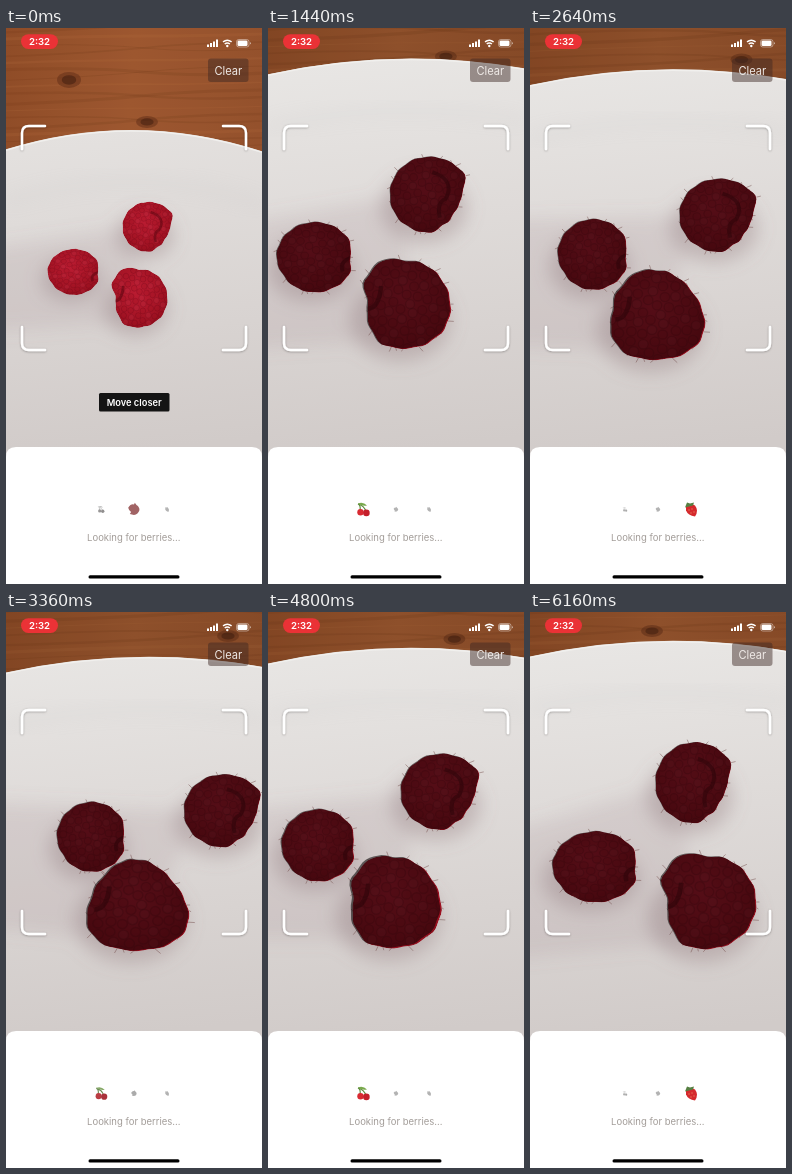
Write an HTML page that moves like this. It is 256x556 px and loops after 6240 ms.

```html
<!DOCTYPE html>
<html lang="en">
<head>
<meta charset="utf-8">
<title>Berry scanner</title>
<style>
  html, body { margin: 0; width: 100%; height: 100%; overflow: hidden; background: #fff; }
  svg { display: block; width: 100%; height: 100%; }
  text { font-family: Inter, Roboto, sans-serif; text-anchor: middle; }
</style>
</head>
<body>
<svg id="stage" viewBox="0 0 256 556" xmlns="http://www.w3.org/2000/svg">
  <defs>
    <linearGradient id="wood" x1="0" y1="0" x2="1" y2=".15">
      <stop offset="0" stop-color="#955029"/><stop offset=".5" stop-color="#a35c32"/><stop offset="1" stop-color="#9a552e"/>
    </linearGradient>
    <linearGradient id="china" gradientUnits="userSpaceOnUse" x1="110" y1="30" x2="150" y2="420">
      <stop offset="0" stop-color="#e8e6e4"/><stop offset=".4" stop-color="#dfdbd9"/><stop offset="1" stop-color="#d1cbc9"/>
    </linearGradient>
    <radialGradient id="flesh" cx=".45" cy=".38" r=".65">
      <stop offset="0" stop-color="#bb1c32"/><stop offset=".6" stop-color="#a81527"/><stop offset="1" stop-color="#960f1e"/>
    </radialGradient>
    <filter id="soft" x="-60%" y="-60%" width="220%" height="220%"><feGaussianBlur stdDeviation="9"/></filter>
    <filter id="glow" x="-20%" y="-20%" width="140%" height="140%"><feDropShadow dx="0" dy=".6" stdDeviation="1" flood-opacity=".35"/></filter>
  </defs>

  <rect width="256" height="420" fill="url(#wood)"/>
  <g id="grain"></g>
  <rect id="shade" width="256" height="420" fill="#26120a"/>
  <path id="plate" fill="url(#china)"/>
  <path id="rim" fill="none" stroke="#f1f0ee" stroke-width="1.500"/>
  <path id="well" fill="none" stroke="#aeb0b2" stroke-width="10" opacity=".1" filter="url(#soft)"/>
  <g id="shadows" fill="#8d7479" filter="url(#soft)"><path id="gloom" opacity=".14"/></g>
  <g id="berries"></g>
  <g id="masks" fill="#060303" fill-opacity=".56"></g>

  <g fill="none" stroke="#fff" stroke-width="2.500" stroke-linecap="round" filter="url(#glow)">
    <path d="M16 121V105Q16 98 23 98H39M217 98H233Q240 98 240 105V121M16 299V315Q16 322 23 322H39M217 322H233Q240 322 240 315V299"/>
  </g>

  <rect x="15" y="6.200" width="37" height="14.800" rx="7.400" fill="#ea3236"/>
  <text x="33.500" y="17" font-size="9.600" font-weight="600" fill="#fff">2:32</text>
  <g transform="translate(0 -.5)">
    <g fill="#fff">
      <path d="M201 17h2v2.500h-2zM204 15.500h2v4h-2zM207 14h2v5.500h-2zM210 12h2v7.500h-2z"/>
      <rect x="231.500" y="13" width="10" height="5.500" rx="1.300"/>
      <path d="M244 14.500q1.400 1.200 0 2.400z"/>
      <circle cx="221.300" cy="18.500" r="1.200"/>
    </g>
    <g fill="none" stroke="#fff">
      <path d="M217 14.400q4.300-3.400 8.600 0M218.700 16.500q2.600-2.200 5.200 0" stroke-width="1.400"/>
      <rect x="230.500" y="12" width="12.500" height="7.500" rx="2.300" stroke-width=".7" opacity=".6"/>
    </g>
  </g>
  <rect x="202" y="30.500" width="40.500" height="23.500" rx="3" fill="#3c2723" fill-opacity=".47"/>
  <text x="222.300" y="46.600" font-size="11.100" fill="#eee9e6">Clear</text>

  <g id="hint">
    <rect x="93" y="365" width="70.500" height="18.500" rx="1.500" fill="#141414"/>
    <text x="128.200" y="377.600" font-size="9.300" font-weight="600" fill="#fff">Move closer</text>
  </g>

  <path d="M0 556V429Q0 419 10 419H246Q256 419 256 429V556Z" fill="#fff"/>
  <g id="icons">
    <g>
      <path d="M-3 1Q-2-4-5-5.500M3 2Q1-4-5-5.500" fill="none" stroke="#5d8a3c" stroke-width="1.200"/>
      <path d="M-5-6Q0-8 4-4Q-1-3-5-6Z" fill="#79a94c"/>
      <circle cx="-2.500" cy="2.800" r="3.200" fill="#d92a32"/><circle cx="3.400" cy="3.400" r="3.300" fill="#c51f2b"/>
    </g>
    <path d="M-7-2Q-4-7 0-6L1-8L3-5.500Q7-3 6.500 1Q5 6 0 6.500L-5 5.500L-3.500 3Q-6 2-7-2Z" fill="#e23436"/>
    <g>
      <path d="M-5-3Q-1-7 4-4Q8 1 4 7Q-3 6-5 1Z" fill="#d5292d"/>
      <path d="M-6-2L-4-7L-1-6L3-7L2-4L-2-3Z" fill="#567f42"/>
      <path d="M-2 0v1M1-1v1M3 2v1M0 3v1" stroke="#f5c37e" stroke-width=".8"/>
    </g>
  </g>
  <text x="127.800" y="512.500" font-size="9.500" fill="#a39d99">Looking for berries...</text>
  <rect x="82.500" y="547.300" width="91" height="3.200" rx="1.600" fill="#000"/>
</svg>
<script>
const LOOP = 6240, LOADER = 1760, TAU = Math.PI * 2;
const NS = 'http://www.w3.org/2000/svg';
const $ = id => document.getElementById(id);
const clamp = v => Math.max(0, Math.min(1, v));

function add(parent, tag, attrs = {}) {
  const el = document.createElementNS(NS, tag);
  set(el, attrs);
  return parent.appendChild(el);
}
function set(el, attrs) {
  for (const k in attrs) el.setAttribute(k, attrs[k]);
}

// Camera poses at these times
const times = [0, 800, 2000, 3360, 4320, 5200, 6160];
const plateTop = [102, 33, 37, 45, 37, 35, 29];
const knot = { x: [141, 158, 196, 222, 206, 167, 122], y: [94, 25, 37, 24, 27, 26, 19] };
const taper = [0, 0, .12, .3, .24, .02, 0];

// "radii" run clockwise from the right in equal turns
const berries = [
  { x: [142, 165, 161, 217, 185, 166, 164], y: [199, 165, 175, 199, 186, 176, 171],
    w: [51, 73, 78, 78, 80, 79, 77], h: [50, 75, 74, 73, 74, 78, 81], lag: .4,
    radii: [.87, .82, .88, 1, .99, 1, 1, 1, 1, 1, 1.03, 1.08] },
  { x: [68, 60, 43, 86, 55, 53, 66], y: [244, 232, 228, 225, 221, 245, 255],
    w: [53, 78, 74, 70, 72, 79, 87], h: [46, 67, 71, 70, 71, 73, 71], lag: .55,
    radii: [.9, 1, .99, 1, .99, .97, 1, 1, 1, 1, 1, 1] },
  { x: [133, 154, 123, 131, 105, 149, 178], y: [270, 273, 280, 293, 287, 293, 290],
    w: [57, 86, 91, 100, 100, 90, 97], h: [60, 88, 90, 92, 92, 94, 96], lag: 1.1, tapers: true,
    radii: [1, 1, .98, .98, 1.02, .9, .81, 1.08, 1.12, .95, .98, .99] }
];

function sample(track, t) {
  const n = times.length - 1;
  let i = 0;
  while (i < n - 1 && t > times[i + 1]) i++;
  const u = clamp((t - times[i]) / (times[i + 1] - times[i]));
  const b = track[i], c = track[i + 1];
  const a = track[Math.max(0, i - 1)], d = track[Math.min(n, i + 2)];
  return b + u / 2 * (c - a + u * (2 * a - 5 * b + 4 * c - d + u * (3 * (b - c) + d - a)));
}

function radiusAt(radii, angle) {
  const n = radii.length, p = ((angle / TAU % 1) + 1) % 1 * n;
  const i = Math.floor(p), u = p - i, ease = u * u * (3 - 2 * u);
  return radii[i % n] * (1 - ease) + radii[(i + 1) % n] * ease;
}
function edge(berry, pose, angle, reach = 1) {
  const lobe = (radiusAt(berry.radii, angle) - 1) * (1 - 2.5 * pose.taper);
  const r = reach * (1 + lobe + .012 * Math.sin(13 * angle + berry.lag * 5));
  const s = Math.sin(angle);
  return (pose.x + pose.w / 2 * r * Math.cos(angle) * (1 + pose.taper * s)).toFixed(2) + ' ' +
         (pose.y + pose.h / 2 * r * s).toFixed(2);
}
function outline(berry, pose) {
  const points = Array.from({ length: 72 }, (_, i) => edge(berry, pose, i / 72 * TAU));
  return 'M' + points.join('L') + 'Z';
}
function hairs(berry, pose) {
  let d = '';
  for (let i = 0; i < 22; i++) {
    const a = i / 22 * TAU + .2 * Math.sin(i * 5.3);
    const tip = 1.07 + .06 * Math.sin(i * 3.7);
    d += 'M' + edge(berry, pose, a) + 'L' + edge(berry, pose, a + .05 * Math.sin(i * 9), tip);
  }
  return d;
}

for (let i = 0; i < 26; i++) {
  const y = -110 + i * 8, bend = 5 * Math.sin(i * 2.1);
  add($('grain'), 'path', {
    d: `M-260 ${y + 8}Q-90 ${y - bend} 0 ${y + bend}T260 ${y - 8}`, fill: 'none',
    stroke: i % 3 ? '#713719' : '#bc7442', 'stroke-width': 1 + i % 4 * .7, opacity: .18
  });
}
[[0, 0, 11, 6], [-78, -42, 12, 8]].forEach(([cx, cy, rx, ry]) => {
  add($('grain'), 'ellipse', { cx, cy, rx, ry, fill: '#5a2b17', opacity: .45 });
  add($('grain'), 'ellipse', { cx, cy, rx: rx * .6, ry: ry * .6, fill: '#3d1b0e', opacity: .5 });
});

berries.forEach((berry, n) => {
  berry.shadow = add($('shadows'), 'ellipse');
  berry.hair = add($('berries'), 'path', { fill: 'none', stroke: '#6d4542', 'stroke-width': .6 });
  berry.clip = add(add(document.querySelector('defs'), 'clipPath', { id: 'clip' + n }), 'path');
  const body = add($('berries'), 'g', { 'clip-path': `url(#clip${n})` });
  berry.body = add(body, 'path', { fill: 'url(#flesh)' });
  berry.texture = add(body, 'g');
  for (let i = 0; i < 62; i++) {
    const r = 1.05 * Math.sqrt((i + .5) / 62), a = i * 2.4;
    add(berry.texture, 'circle', {
      cx: r * Math.cos(a), cy: r * Math.sin(a), r: .1, fill: i % 3 ? '#9a1022' : '#c4384a',
      'fill-opacity': .2, stroke: '#5f0817', 'stroke-width': .03, 'stroke-opacity': .25
    });
  }
  const crease = ['M.1-.6Q.7-.4.45.1Q.2.2.3.6', 'M.95 0Q.6.1.7.4', 'M-.85.1Q-.6.1-.55-.4'][n];
  add(berry.texture, 'path', { d: crease, fill: 'none', stroke: '#56050f', 'stroke-width': .1, opacity: .5 });
  berry.mask = add($('masks'), 'path');
});

function drawPlate(t, near) {
  const top = sample(plateTop, t);
  const left = top + 20 - 4 * near, right = top + 22 - 12 * near;
  const arc = shift => `M-2 ${left + shift}Q128 ${2 * top - (left + right) / 2 + shift} 258 ${right + shift}`;
  set($('plate'), { d: arc(0) + 'V430H-2Z' });
  set($('rim'), { d: arc(1) });
  set($('well'), { d: arc(52) });
  set($('shade'), { opacity: .05 + .12 * near });
  set($('grain'), { transform: `translate(${sample(knot.x, t)} ${sample(knot.y, t)})` });
}

function drawBerries(t, near) {
  const delay = 1 + 14 * Math.exp(-(((t - 5200) / 220) ** 2));
  const poses = berries.map(berry => {
    const pose = { taper: berry.tapers ? sample(taper, t) : 0 };
    for (const k of ['x', 'y', 'w', 'h']) pose[k] = sample(berry[k], t);
    return pose;
  });
  berries.forEach((berry, i) => {
    const pose = poses[i], d = outline(berry, pose);
    set(berry.body, { d });
    set(berry.clip, { d });
    set(berry.texture, { transform: `translate(${pose.x} ${pose.y}) scale(${pose.w / 2} ${pose.h / 2})` });
    set(berry.shadow, {
      cx: pose.x - pose.w * .06, cy: pose.y + pose.h * .17, rx: pose.w * .56, ry: pose.h * .46, opacity: .34
    });
    set(berry.hair, { d: hairs(berry, pose), opacity: .75 * near });
    const shift = delay * berry.lag;
    set(berry.mask, { d: outline(berry, { ...pose, x: pose.x - shift, y: pose.y - shift * .5 }) });
  });
  // Broad shade that falls to the left of the group
  const [a, b, c] = poses;
  set($('gloom'), { d: `M-20 ${b.y - b.h * .5}L${a.x - a.w * .3} ${a.y}L${c.x} ${c.y + c.h * .4}L-20 ${b.y + b.h * 1.3}Z` });
  set($('masks'), { opacity: t < 480 ? 0 : 1 });
  set($('hint'), { opacity: t < 480 ? 1 : 0 });
}

function drawLoader(t) {
  const phase = t / LOADER + .5;
  [...$('icons').children].forEach((icon, i) => {
    const turn = phase - (.3 + i / 3);
    const away = Math.abs(turn - Math.round(turn));
    const live = clamp((.167 + .07 - away) / .14);
    set(icon, { transform: `translate(${95 + 33 * i} 481.5) scale(${.34 + .66 * live})`, opacity: .45 + .55 * live });
    icon.style.filter = `saturate(${live ** 3})`;
  });
}

function draw(now) {
  const t = now % LOOP, near = clamp(t / 800);
  drawPlate(t, near);
  drawBerries(t, near);
  drawLoader(t);
}

const start = performance.now();
function tick() {
  draw(performance.now() - start);
  requestAnimationFrame(tick);
}
tick();
</script>
</body>
</html>
```
